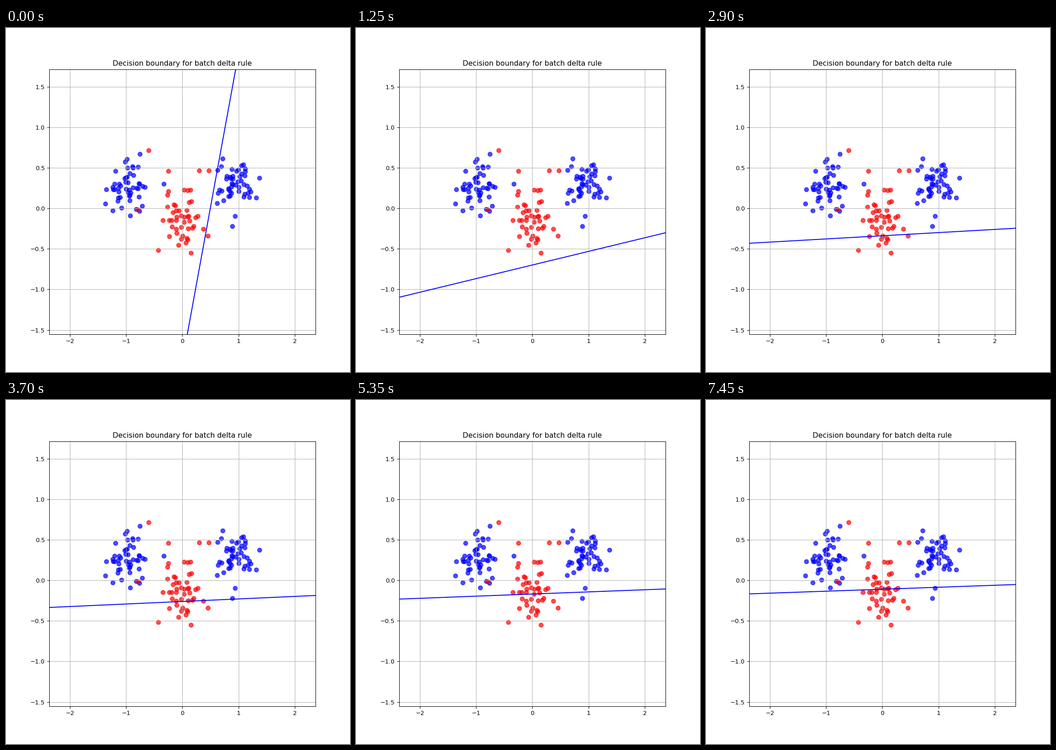
Write a matplotlib script that moves like this. It is 748x748 px and loops after 7500 ms.

```python
import numpy as np
import matplotlib.pyplot as plt
from matplotlib.animation import FuncAnimation

FRAMES = 150
XLIM = (-2.372, 2.372)
YLIM = (-1.552, 1.716)
rng = np.random.default_rng(7)


def cluster(center, sigma, outer, count=50):
    """Truncated Gaussian blob plus a few points that set its outline."""
    n = count - len(outer)
    share = (np.arange(n) + 0.5) / n
    radius = np.sqrt(-2 * np.log(1 - 0.9 * share))
    angle = rng.uniform(0, 2 * np.pi, n)
    unit = radius * np.array([np.cos(angle), np.sin(angle)])
    core = np.array(center) + unit.T * sigma
    return np.vstack([core, outer])


def weights(epoch):
    """Batch delta rule: each weight relaxes along the error's eigenmodes."""
    slow, side, fast = np.exp(-np.array([0.0065, 0.066, 0.092]) * epoch)
    wx = -0.0447 + 0.0316 * slow - 0.26 * side
    wy = 2.1 - 1.9915 * slow - 0.0366 * fast
    bias = 0.02 + 0.334 * slow - 0.218 * fast
    return wx, wy, bias


left = cluster((-0.98, 0.255), (0.19, 0.175), [
    (-0.33, 0.30), (-0.756, 0.671), (-1.373, 0.058), (-0.93, -0.09),
    (-0.985, 0.606)])
right = cluster((0.95, 0.31), (0.18, 0.145), [
    (1.37, 0.373), (0.717, 0.614), (0.893, -0.223), (0.942, -0.095),
    (0.619, 0.064), (1.318, 0.132)])
middle = cluster((-0.02, -0.12), (0.2, 0.2), [
    (-0.597, 0.716), (0.475, 0.467), (0.304, 0.469), (-0.249, 0.461),
    (-0.785, -0.016), (-0.425, -0.518), (0.156, -0.552), (0.459, -0.34)])

fig, ax = plt.subplots(figsize=(8, 8), dpi=93.5)
for points, color in ((np.vstack([left, right]), "blue"), (middle, "red")):
    ax.scatter(*points.T, s=50, color=color, alpha=0.7)
ax.set_title("Decision boundary for batch delta rule")
ax.set_xlim(XLIM)
ax.set_ylim(YLIM)
ax.grid(True)
xs = np.array(XLIM)
line, = ax.plot(xs, xs, color="blue")


def update(frame):
    wx, wy, bias = weights(frame)
    line.set_data(xs, -(wx * xs + bias) / wy)
    return line,


anim = FuncAnimation(fig, update, frames=FRAMES, interval=50, repeat=True,
                     repeat_delay=0)
plt.show()
```
